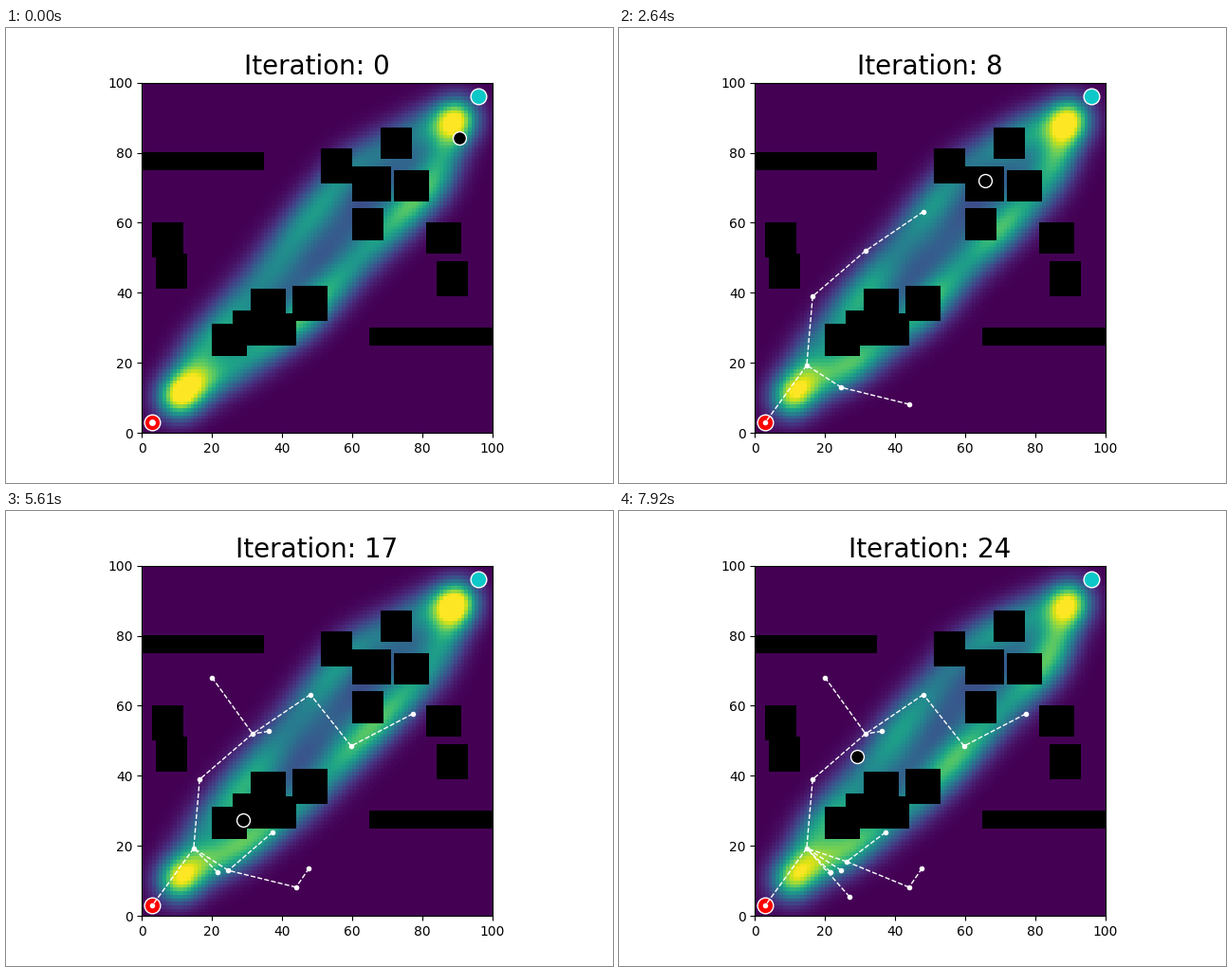
A matplotlib script for the animation above (8000 ms loop, 640x480 px).

```python
import numpy as np
import matplotlib.pyplot as plt
from matplotlib.animation import FuncAnimation
from matplotlib.collections import LineCollection

STEP, TICK, LOOP = 330, 40, 8000
LAST = LOOP // STEP
SIZE, SIGMA, REACH = 100, 4.2, 20
START, GOAL = (3, 3), (96, 96)

# x, y, width, height
OBSTACLES = [
    (0, 75, 35, 5), (65, 25, 35, 5), (3, 50, 9, 10), (4, 41, 9, 10),
    (51, 71, 9, 10), (60, 66, 11, 10), (68, 78, 9, 9), (72, 66, 10, 9),
    (60, 55, 9, 9), (81, 51, 10, 9), (84, 39, 9, 10), (31, 31, 10, 10),
    (26, 25, 10, 10), (20, 22, 10, 9), (35, 25, 9, 9), (43, 32, 10, 10),
]

# Way points and mean density of each corridor
CORRIDORS = [
    ([(10, 10), (27, 19), (46, 33), (62, 50), (83, 71), (90, 89)], 0.62),
    ([(10, 10), (17, 24), (33, 43), (45, 58), (60, 76), (82, 88), (90, 89)],
     0.45),
    ([(22, 25), (78, 78)], 0.18),
]

# iteration added: (x, y, iteration of the parent)
NODES = {
    0: (*START, None), 1: (14.8, 19.3, 0), 2: (16.5, 39, 1),
    3: (24.7, 13, 1), 5: (31.6, 52, 2), 6: (48.1, 63.2, 5),
    7: (44, 8.2, 3), 9: (36.2, 52.7, 5), 10: (37.3, 23.9, 3),
    11: (21.6, 12.5, 1), 12: (47.7, 13.6, 7), 14: (20, 68.1, 5),
    15: (59.7, 48.5, 6), 16: (77.3, 57.7, 15), 19: (26.2, 15.5, 1),
    23: (27, 5.5, 1),
}
REWIRED = {7: 19, 10: 19}

# Samples that could not be joined to the tree
MISSES = {0: (90.7, 84.2), 4: (38.7, 32), 8: (65.8, 72), 13: (33.8, 41.3),
          17: (29, 27.3), 21: (9.2, 43.8), 24: (29.2, 45.5)}

gx, gy = np.meshgrid(np.arange(SIZE) + 0.5, np.arange(SIZE) + 0.5)
walls = np.zeros((SIZE, SIZE), bool)
for x, y, w, h in OBSTACLES:
    walls[y:y + h, x:x + w] = True


def blob(x, y):
    return np.exp(-((gx - x) ** 2 + (gy - y) ** 2) / (2 * SIGMA ** 2))


def ridge(points):
    """Evenly spaced blobs along a polyline, scaled to a crest of one."""
    pts = np.array(points, float)
    dist = np.r_[0, np.hypot(*np.diff(pts, axis=0).T).cumsum()]
    s = np.linspace(0, 1, 45)
    xs, ys = (np.interp(s * dist[-1], dist, axis) for axis in pts.T)
    gap = dist[-1] / (len(s) - 1)
    blobs = np.array([blob(x, y) for x, y in zip(xs, ys)])
    return s, blobs * gap / (SIGMA * np.sqrt(2 * np.pi))


ridges = [(*ridge(points), level) for points, level in CORRIDORS]


def density(it):
    rng = np.random.default_rng(it)
    field = rng.uniform(0.2, 0.4) * blob(10, 9.5) + 0.5 * blob(90, 90)
    for s, blobs, level in ridges:
        waves, phase = rng.uniform(2, 4), rng.uniform()
        heat = level * (1 + 0.2 * np.cos(2 * np.pi * (waves * s + phase)))
        field = field + np.tensordot(heat, blobs, 1)
    return np.ma.array(np.clip(field, 0, 1), mask=walls)


def tree(it):
    alive = [k for k in NODES if k <= it]
    edges = []
    for k in alive[1:]:
        parent = REWIRED[k] if REWIRED.get(k) in alive else NODES[k][2]
        edges.append([NODES[k][:2], NODES[parent][:2]])
    return [NODES[k][:2] for k in alive], edges


def sample_at(it):
    if it in MISSES:
        return MISSES[it]
    if it not in NODES:
        return np.random.default_rng(it).uniform(10, 90, 2)
    x, y, parent = NODES[it]
    px, py, _ = NODES[parent]
    # A full-length branch points at a sample beyond its tip
    far = 1.5 if np.hypot(x - px, y - py) > REACH - 0.5 else 1
    return px + far * (x - px), py + far * (y - py)


steps = range(LAST + 1)
fields = [density(i) for i in steps]
trees = [tree(i) for i in steps]
samples = [sample_at(i) for i in steps]

cmap = plt.get_cmap("viridis").copy()
cmap.set_bad("black")
fig, ax = plt.subplots(figsize=(6.4, 4.8), dpi=100)
image = ax.imshow(fields[0], origin="lower", extent=(0, SIZE, 0, SIZE),
                  cmap=cmap, vmin=0, vmax=1, interpolation="nearest")


def disc(xy, color, size, z):
    return ax.plot(*[[c] for c in xy], "o", color=color, ms=size,
                   mec="white", mew=1, zorder=z)[0]


disc(START, "red", 12, 3)
disc(GOAL, "#0cc8c8", 12, 3)
branches = LineCollection([], colors="white", linewidths=1,
                          linestyles="--", zorder=4)
ax.add_collection(branches)
dots, = ax.plot([], [], "o", color="white", ms=4, mew=0, zorder=5)
sample = disc(samples[0], "black", 10, 6)
title = ax.set_title("Iteration: 0", fontsize=20)
ax.set_xlim(0, SIZE)
ax.set_ylim(0, SIZE)


def update(frame):
    it = min(int((frame + 0.5) * TICK // STEP), LAST)
    points, edges = trees[it]
    image.set_data(fields[it])
    branches.set_segments(edges)
    dots.set_data(*zip(*points))
    dots.set_markersize(4 if edges else 5)
    sample.set_data(*[[c] for c in samples[it]])
    title.set_text(f"Iteration: {it}")
    return image, branches, dots, sample, title


anim = FuncAnimation(fig, update, frames=LOOP // TICK, interval=TICK,
                     repeat=True, repeat_delay=0)
plt.show()
```
